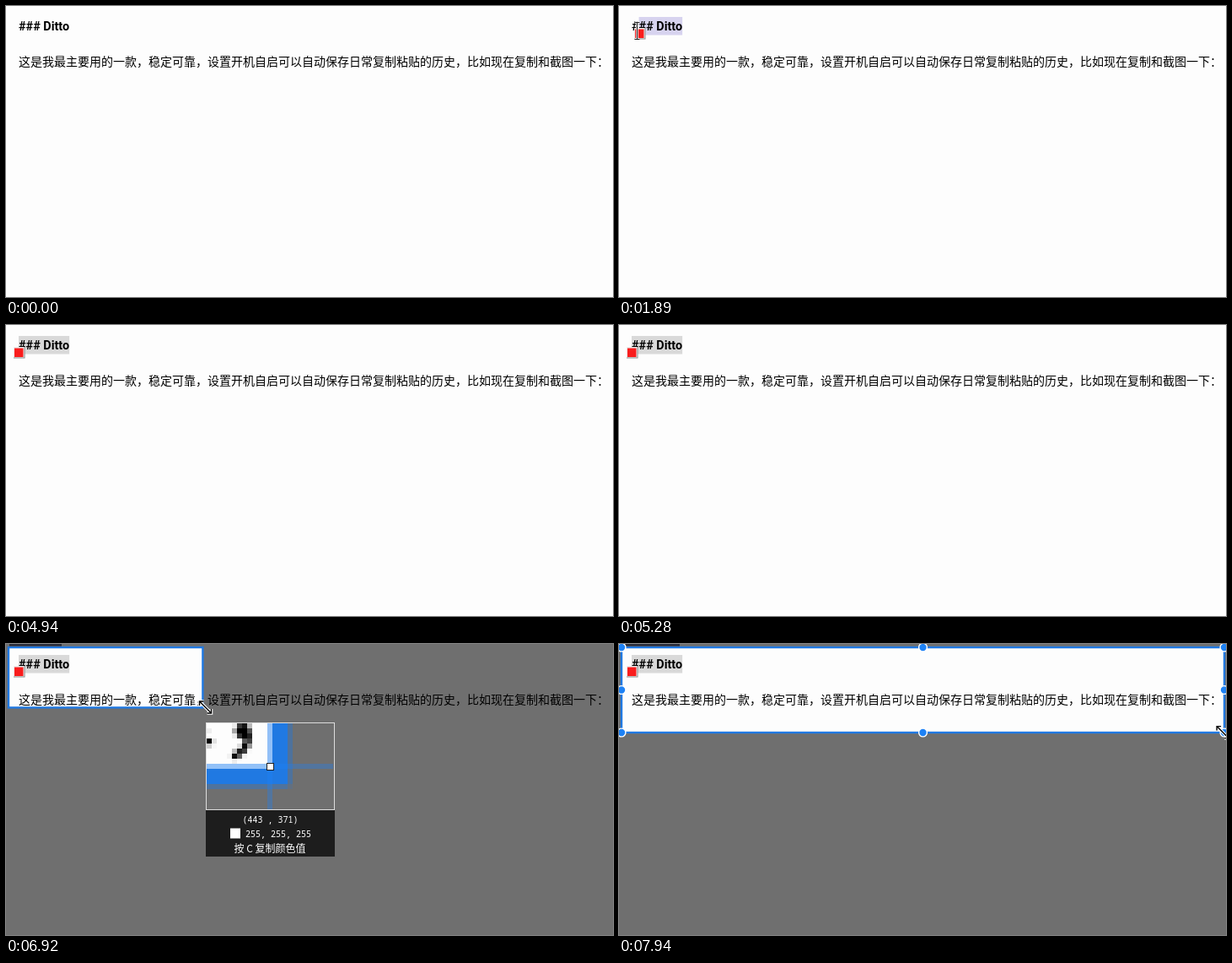
An HTML page with a canvas for the animation above (8 s loop, 720x345 px).

```html
<!DOCTYPE html>
<html lang="zh-CN">
<head>
<meta charset="utf-8">
<title>Clipboard and screenshot demo</title>
<style>
  html, body { margin: 0; width: 100%; height: 100%; overflow: hidden; background: #fdfdfd; }
  canvas { display: block; }
</style>
</head>
<body>
<canvas id="stage" width="720" height="345"></canvas>
<script>
const W = 720, H = 345, LOOP = 8000;
const CJK = '"Noto Sans CJK SC", "Noto Sans CJK", sans-serif';
const MONO = '10px "Noto Sans Mono", "Liberation Mono", monospace';
const TITLE_FONT = 'bold 14.4px Roboto, sans-serif';
const TITLE = '### Ditto';
const LINE = '这是我最主要用的一款，稳定可靠，设置开机自启可以自动保存日常复制粘贴的历史，比如现在复制和截图一下：';
const BLUE = '#2079e2';

const ctx = document.getElementById('stage').getContext('2d');
const lens = document.createElement('canvas');
lens.width = 25;
lens.height = 17;
const lensCtx = lens.getContext('2d');

// Pointer moves: first step, last step, step count, end x, end y
const START = [150, -14];
const MOVES = [
  [450, 900, 5, 83, 24],
  [1170, 1890, 8, 21, 29],
  [1980, 2180, 3, 18, 30],
  [2470, 2580, 2, 24, 38],
  [3140, 3340, 3, 26, 37],
  [3540, 3870, 4, 598, 205],
  [5360, 5360, 1, 700, 345],
  [5370, 5950, 7, 31, 27],
  [6060, 6150, 2, 5.3, 5.3],
  [6720, 6920, 3, 232, 74],
  [7010, 7480, 6, 690, 116],
  [7590, 7680, 2, 714.6, 103.6],
  [7940, 7940, 1, 716.6, 103.6]
];

function pointerAt(t) {
  let [x, y] = START;
  for (const [t0, t1, n, tx, ty] of MOVES) {
    if (t < t0) break;
    const done = n === 1 ? 1 : Math.min(n, Math.floor((t - t0) / (t1 - t0) * (n - 1) + 1e-6) + 1);
    let p = done / n;
    if (n > 3 && n !== 8) p *= 2 - p;
    x += (tx - x) * p;
    y += (ty - y) * p;
  }
  return { x, y };
}

ctx.font = TITLE_FONT;
const stops = [...TITLE].map((_, i) => 15 + ctx.measureText(TITLE.slice(0, i)).width);
const titleEnd = 15 + ctx.measureText(TITLE).width;
stops.push(titleEnd);

function nearestStop(x) {
  return stops.reduce((a, b) => Math.abs(b - x) < Math.abs(a - x) ? b : a);
}

function box(c, fill, x, y, w, h) {
  c.fillStyle = fill;
  c.fillRect(x, y, w, h);
}

function label(c, str, font, fill, x, y, align = 'left') {
  c.font = font;
  c.fillStyle = fill;
  c.textAlign = align;
  c.fillText(str, x, y);
}

function drawPage(c, t, p) {
  box(c, '#fdfdfd', -20, -20, W + 60, H + 60);
  const caret = t < 2200 ? nearestStop(p.x) : 15;
  if (t >= 1170) box(c, t < 4940 ? '#d7d3ef' : '#d9d9d9', caret, 13, titleEnd - caret, 21.5);
  label(c, TITLE, TITLE_FONT, '#000', 15, 29);
  label(c, LINE, '14px ' + CJK, '#000', 15, 71);
  if (t >= 1170) {
    const x = Math.round(caret) - 6;
    box(c, '#8c8c8c', x, 26, 13.5, 13.5);
    box(c, '#eee', x, 26, 12.5, 12.5);
    box(c, '#f91d1d', x + 1, 27.5, 10.5, 10.5);
  }
}

function drawSelection(c, s) {
  c.beginPath();
  c.rect(-20, -20, W + 60, H + 60);
  c.rect(s.x, s.y, s.w, s.h);
  c.fillStyle = 'rgba(0,0,0,.56)';
  c.fill('evenodd');
  c.strokeStyle = BLUE;
  c.lineWidth = 2.4;
  c.strokeRect(s.x, s.y, s.w, s.h);
}

function drawHandles(c, s) {
  c.fillStyle = '#1e82f5';
  c.strokeStyle = '#fff';
  c.lineWidth = 1.4;
  for (let i = 0; i < 9; i++) {
    if (i === 4) continue;
    c.beginPath();
    c.arc(s.x + s.w * (i % 3) / 2, s.y + s.h * Math.floor(i / 3) / 2, 4.9, 0, 7);
    c.fill();
    c.stroke();
  }
}

// Window outline as seen in the magnifier
function drawEdge(c) {
  ['#cfcfcf', '#c4c4c4', '#b4b4b4'].forEach((g, i) => box(c, g, -3 + i * 2 / 3, -10, 0.7, H + 20));
  box(c, '#d48449', -1, -10, 2, H + 20);
  box(c, '#d48449', -1, -1.6, W + 20, 2);
}

function drawMagnifier(t, p, s) {
  const l = lensCtx;
  l.setTransform(1.5, 0, 0, 1.5, 12.5 - p.x * 1.5, 8.5 - p.y * 1.5);
  drawPage(l, t, p);
  if (s) drawSelection(l, s);
  else drawEdge(l);

  ctx.save();
  ctx.translate(Math.round(p.x + (s ? 5 : 6.7)), Math.round(p.y + 19.4));
  box(ctx, 'rgba(0,0,0,.74)', 0, 103, 153, 56);
  ctx.imageSmoothingEnabled = false;
  ctx.drawImage(lens, 1, 1, 150, 102);
  const tint = 'rgba(30,130,245,.35)';
  box(ctx, tint, 73, 1, 6, 102);
  box(ctx, tint, 1, 49, 72, 6);
  box(ctx, tint, 79, 49, 72, 6);
  ctx.lineWidth = 1;
  ctx.strokeStyle = s ? '#ddd' : '#7d8583';
  ctx.strokeRect(0.5, 0.5, 152, 103);
  box(ctx, '#222', 72, 48, 9, 9);
  box(ctx, '#fff', 73, 49, 7, 7);

  const px = Math.round(95 + p.x * 1.5), py = Math.round(260 + p.y * 1.5);
  label(ctx, `(${px} , ${py})`, MONO, '#fff', 76.5, 118.5, 'center');
  box(ctx, '#fff', 29, 125.5, 12, 12);
  label(ctx, '255, 255, 255', MONO, '#fff', 47, 135.5);
  label(ctx, '按 C 复制颜色值', '12px ' + CJK, '#fff', 76, 153.5, 'center');
  ctx.restore();
}

function strokeTwice(points, outer, inner) {
  for (const [color, width] of [outer, inner]) {
    ctx.beginPath();
    points.forEach(([x, y, move]) => move ? ctx.moveTo(x, y) : ctx.lineTo(x, y));
    ctx.strokeStyle = color;
    ctx.lineWidth = width;
    ctx.stroke();
  }
}

function drawBeam(x, y) {
  ctx.save();
  ctx.translate(Math.round(x) + 0.5, Math.round(y) + 0.5);
  strokeTwice([[-3, -10, 1], [3, -10], [0, -10, 1], [0, 10], [-3, 10, 1], [3, 10]],
    ['#fff', 2.6], ['#222', 1]);
  ctx.restore();
}

function drawCross(x, y) {
  box(ctx, '#0c39a6', x - 1.5, y - 13, 2.7, 26);
  box(ctx, '#0c39a6', x - 12, y - 1.5, 24, 2.7);
}

function drawResize(x, y) {
  ctx.save();
  ctx.translate(x, y);
  strokeTwice([[-7, -7, 1], [7, 7], [-7, -2, 1], [-7, -7], [-2, -7], [7, 2, 1], [7, 7], [2, 7]],
    ['#fff', 3.6], ['#000', 1.4]);
  ctx.restore();
}

function draw(t) {
  const p = pointerAt(t);
  const dragging = t >= 6720;
  const sel = dragging ? { x: 3, y: 4, w: p.x - 1.6, h: p.y - 2.6 } : null;

  drawPage(ctx, t, p);
  if (sel) {
    drawSelection(ctx, sel);
    box(ctx, '#2b2d3a', 4, 0, sel.w * 1.5 < 1000 ? 62 : 68, 2.6);
  }
  if (t >= 7680) drawHandles(ctx, sel);

  if (t < 3960) drawBeam(p.x, p.y);
  else if (t >= 5370 && !dragging) drawCross(p.x, p.y);

  if (t >= 5370 && t < 7680) drawMagnifier(t, p, sel);
  if (dragging) drawResize(p.x + (t < 7680 ? 4.5 : -0.5), p.y + 1);
}

const begin = performance.now();
function tick() {
  draw((performance.now() - begin) % LOOP);
  requestAnimationFrame(tick);
}
tick();
</script>
</body>
</html>
```
